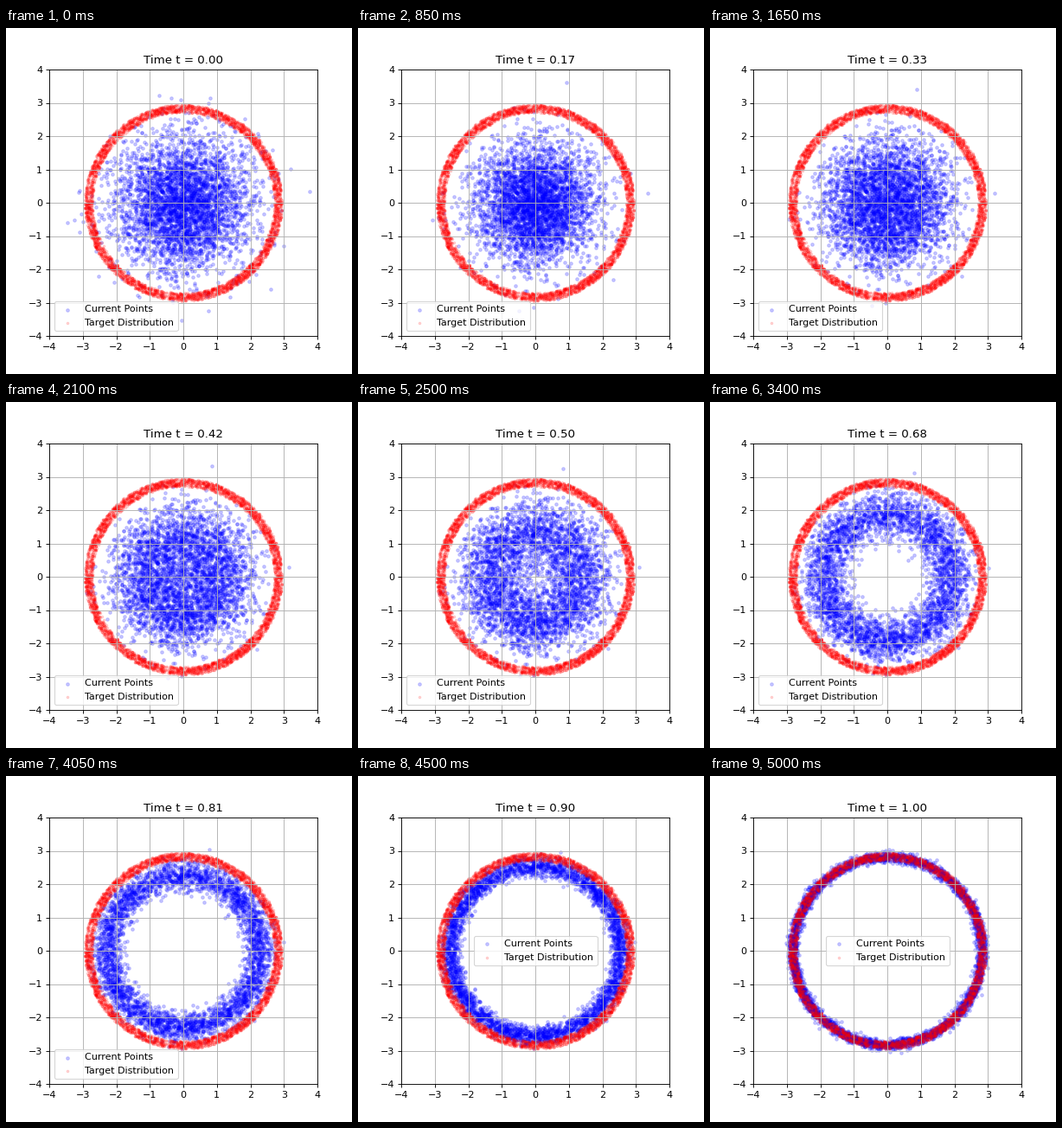
Write a matplotlib script that moves like this. It is 400 by 400 pixels and loops after 5.05 s.

```python
import numpy as np
import matplotlib.pyplot as plt
from matplotlib.animation import FuncAnimation

STEPS = 100
COUNT = 4000
RADIUS = 2.83
OPEN_STEP = 84  # the middle is empty from here on, so the legend moves there

rng = np.random.default_rng(7)


def polar(r, angle):
    return np.column_stack([r * np.cos(angle), r * np.sin(angle)])


def mean_cos(kappa):
    """Mean cosine of a von Mises angle, the Bessel ratio I1 / I0."""
    c = np.cos((np.arange(48) + 0.5) * np.pi / 48)
    weight = np.exp(np.minimum(kappa, 150)[:, None] * (c - 1))
    return weight @ c / weight.sum(axis=1)


def flow(r, goal):
    """Radii at every step of the flow from a Gaussian to a ring."""
    path = [r]
    for k in range(STEPS):
        t = k / STEPS
        pull = goal * mean_cos(r * t * goal / (1 - t) ** 2)
        r = r + (pull - r) / (1 - t) / STEPS
        path.append(r)
    return path


start = rng.normal(size=(COUNT, 2))
r0 = np.hypot(*start.T)
angle = np.arctan2(start[:, 1], start[:, 0])
goal = RADIUS + 0.04 * (r0 - 1.25) + 0.075 * rng.normal(size=COUNT)
radii = flow(r0, goal)

ring = polar(np.sqrt(rng.uniform(2.71 ** 2, 2.95 ** 2, COUNT)),
             rng.uniform(0, 2 * np.pi, COUNT))

fig, ax = plt.subplots(figsize=(5, 5), dpi=80)
dots = ax.scatter(*start.T, s=10, color="blue", alpha=0.2,
                  label="Current Points")
ax.scatter(*ring.T, s=5, color="red", alpha=0.15, label="Target Distribution")
ax.set_xlim(-4, 4)
ax.set_ylim(-4, 4)
ax.grid(True)
title = ax.set_title("Time t = 0.00")
legend = ax.legend(loc="lower left")


def update(k):
    dots.set_offsets(polar(radii[k], angle))
    title.set_text(f"Time t = {k / STEPS:.2f}")
    legend.set_loc("center" if k >= OPEN_STEP else "lower left")
    return dots, title, legend


anim = FuncAnimation(fig, update, frames=STEPS + 1, interval=50,
                     repeat=True, repeat_delay=0)
plt.show()
```
